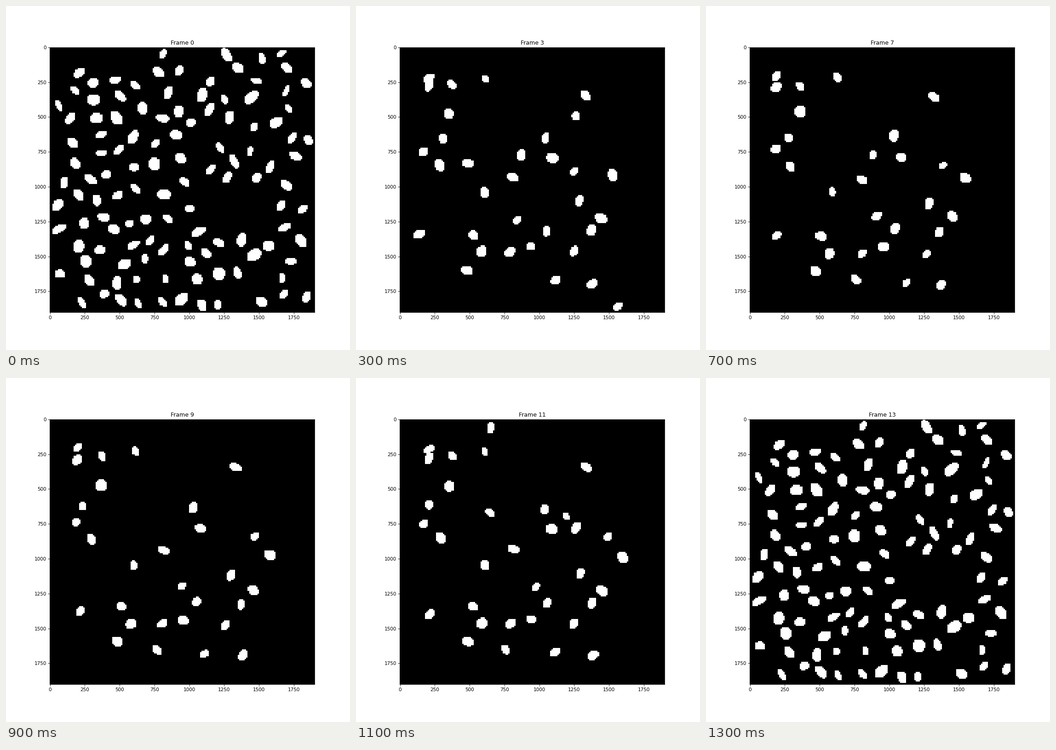
These frames come from a looping animation (748 px wide and 748 px high, 1.4 s). A matplotlib script:

```python
import numpy as np
import matplotlib.pyplot as plt
from matplotlib.animation import FuncAnimation

plt.rcParams["font.family"] = "DejaVu Sans"

STAGE, INCHES = 748, 10
GRID, SCALE = 190, 10          # image cells per side, axis units per cell
FRAMES, INTERVAL = 14, 100
CROWDED = (0, FRAMES - 1)      # frames that show the full population
DRIFT_START, DRIFT_END = 3, 11
CROWD_SIZE, CROWD_GAP = 117, 11

# Where tracked blobs live, in image cells.
SETTLED = [(20, 21), (20, 28), (37, 27), (62, 22), (133, 35), (36, 47), (18, 74),
           (29, 85), (104, 64), (109, 79), (81, 94), (60, 104), (129, 111),
           (145, 122), (52, 135), (58, 147), (80, 147), (95, 143), (105, 131),
           (137, 132), (126, 147), (48, 160), (112, 168), (138, 170)]
DRIFTING = [((32, 66), (22, 62)), ((126, 88), (150, 83)), ((84, 123), (98, 120)),
            ((15, 133), (22, 139)), ((152, 91), (159, 98))]
LEAVING = {4: [(127, 49), (157, 185)], 6: [(50, 83)], 8: [(88, 77)]}
ARRIVING = {7: [(76, 166)], 11: [(66, 7), (64, 66), (120, 70), (127, 78)]}

ROWS, COLS = np.mgrid[:GRID, :GRID] + 0.5


def stamp(image, x, y, width, height, lean):
    """Fill a leaning ellipse with blunt ends."""
    u = (COLS - x) / (width / 2)
    v = (ROWS - y) / (height / 2)
    oval = (u * u - 2 * lean * u * v + v * v) / (1 - lean * lean) <= 1.15
    image[oval & (abs(u) < 1) & (abs(v) < 1)] = 1


def in_clearing(x, y):
    """Bare patches: the top left corner and an area right of the middle."""
    return (x < 70 and y < 18) or np.hypot((x - 135) / 25, (y - 113) / 20) < 1


def make_crowd():
    """Scatter blobs at random, keeping a least distance between them."""
    rng = np.random.default_rng(8)
    image = np.zeros((GRID, GRID))
    centres = []
    while len(centres) < CROWD_SIZE:
        x, y = rng.uniform(4, GRID - 4, 2)
        crowded = any(np.hypot(x - a, y - b) < CROWD_GAP for a, b in centres)
        if crowded or in_clearing(x, y):
            continue
        centres.append((x, y))
        width, height = rng.normal((7.2, 7.2), 1.4).clip(4, 10)
        stamp(image, x, y, width, height, rng.uniform(-.6, .6))
    return image


def make_tracks():
    """List (start, end, first frame, last frame) for every tracked blob."""
    tracks = [(p, p, 0, FRAMES) for p in SETTLED]
    tracks += [(a, b, 0, FRAMES) for a, b in DRIFTING]
    tracks += [(p, p, 0, last) for last, points in LEAVING.items() for p in points]
    tracks += [(p, p, first, FRAMES) for first, points in ARRIVING.items() for p in points]
    return tracks


def ease(frame):
    t = np.clip((frame - DRIFT_START) / (DRIFT_END - DRIFT_START), 0, 1)
    return t * t * (3 - 2 * t)


def draw_tracked(frame):
    image = np.zeros((GRID, GRID))
    for number, (start, end, first, last) in enumerate(TRACKS):
        if not first <= frame <= last:
            continue
        rng = np.random.default_rng(number)
        size = rng.uniform((5.2, 5.5), (8, 8.2))
        lean = rng.uniform(-.4, .4)
        phase = rng.uniform(0, 2 * np.pi, 4)
        wobble = np.sin(0.7 * frame + phase)
        x, y = np.array(start) + ease(frame) * np.subtract(end, start) + wobble[:2]
        width, height = size + 0.7 * wobble[2:]
        stamp(image, x, y, width, height, lean)
    return image


CROWD = make_crowd()
TRACKS = make_tracks()

fig, ax = plt.subplots(figsize=(INCHES, INCHES), dpi=STAGE / INCHES)
side = GRID * SCALE
picture = ax.imshow(CROWD, cmap="gray", vmin=0, vmax=1, interpolation="nearest",
                    extent=(-0.5, side - 0.5, side - 0.5, -0.5))
title = ax.set_title("Frame 0")


def update(frame):
    picture.set_data(CROWD if frame in CROWDED else draw_tracked(frame))
    title.set_text(f"Frame {frame}")
    return picture, title


anim = FuncAnimation(fig, update, frames=FRAMES, interval=INTERVAL,
                     repeat=True, repeat_delay=0, blit=False)
plt.show()
```
